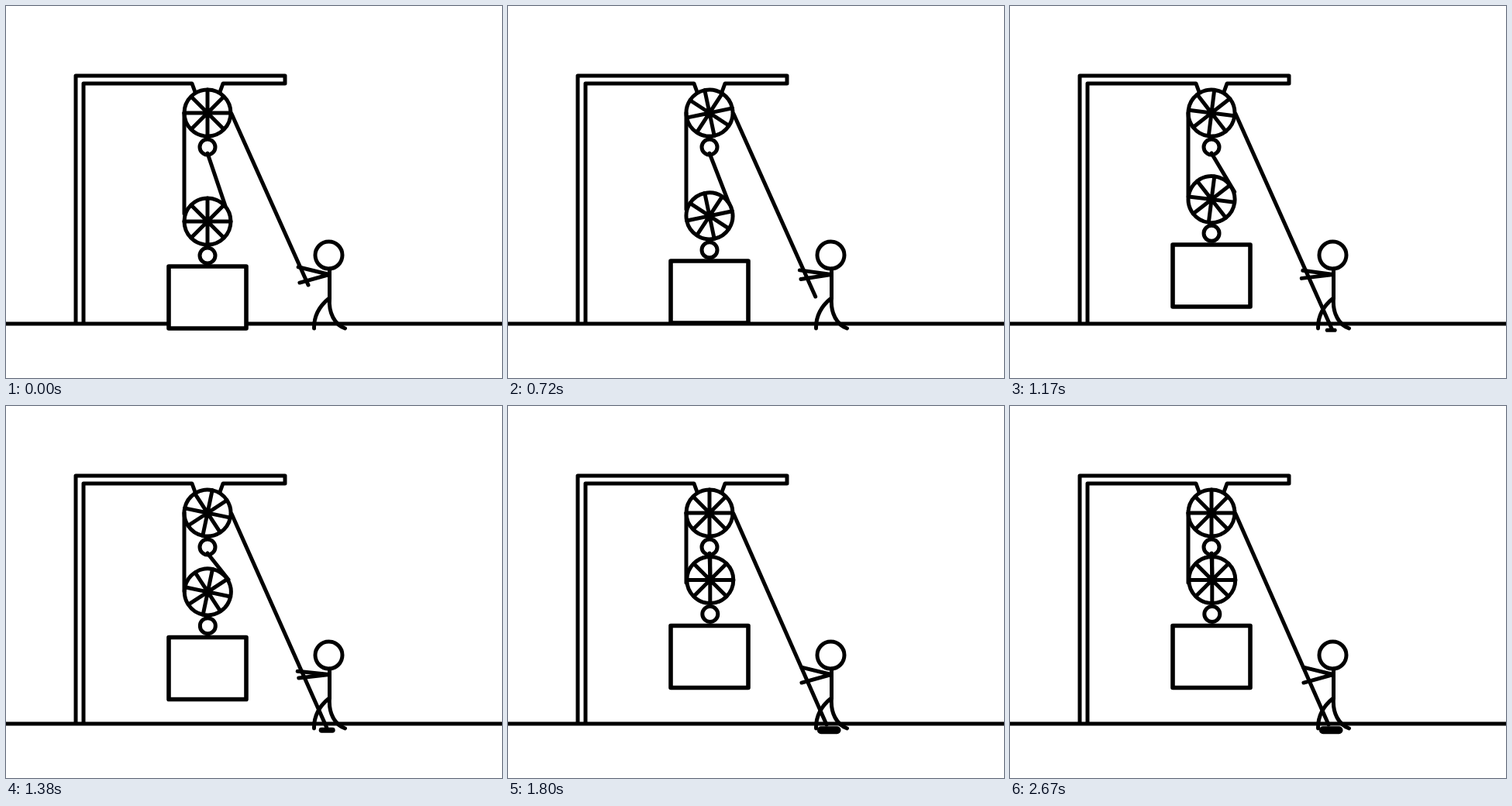
An HTML page for the animation above (2.7 s loop, 640x480 px).

```html
<!DOCTYPE html>
<html lang="en">
<head>
<meta charset="utf-8">
<title>Pulley</title>
<style>
html, body { margin: 0; width: 100%; height: 100%; overflow: hidden; background: #fff; }
svg { display: block; width: 100%; height: 100%; }
</style>
</head>
<body>
<svg viewBox="0 0 640 480" fill="none" stroke="#000" stroke-width="5" stroke-linecap="round" stroke-linejoin="round">
  <defs>
    <g id="wheel">
      <circle r="30"/>
      <path d="M-30 0H30M0-30V30M-21-21L21 21M-21 21L21-21"/>
    </g>
  </defs>
  <path d="M0 410H640"/>
  <path d="M90 408V90H360V100H280L276 111M100 408V100H240L244 111"/>
  <use id="top" href="#wheel"/>
  <circle cx="260" cy="182" r="10"/>
  <path id="rope"/>
  <use id="low" href="#wheel"/>
  <circle id="ring" r="10"/>
  <rect id="load" x="210" width="100" height="80" fill="#fff" stroke-width="5.6"/>
  <circle cx="416.5" cy="321.5" r="17.5"/>
  <path d="M417.5 339V378M417 377Q397 393 397.5 416M417.5 377C416 396 424 411 437.5 416"/>
  <path id="arms"/>
  <rect id="coil" fill="#000" stroke="none"/>
</svg>
<script>
const LOOP = 2700, STEP = 30, HOLD = 19, MID = 19, TURN = 27, END = 38;
const $ = id => document.getElementById(id);
const set = (id, attrs) => {
  for (const name in attrs) $(id).setAttribute(name, attrs[name]);
};
const lerp = (a, b, u) => a + (b - a) * u;

function draw(now) {
  const step = Math.floor(now % LOOP / STEP) - HOLD;
  const s = Math.max(0, Math.min(END, step));
  const late = Math.max(0, (s - MID) / (END - MID));

  // Two equal linear halves: a to b to c
  const tween = (a, b, c) => s < MID ? lerp(a, b, s / MID) : lerp(b, c, late);
  // Same, with an extra key in the second half
  const bend = (a, b, c, d) =>
    s < MID ? lerp(a, b, s / MID) :
    s < TURN ? lerp(b, c, (s - MID) / (TURN - MID)) :
    lerp(c, d, (s - TURN) / (END - TURN));

  const spin = tween(0, -45, 90);
  const lowX = tween(260, 260, 260.8);
  set('top', { transform: `translate(260 138) rotate(${spin})` });
  set('low', { transform: `translate(${lowX} ${tween(278, 251, 224.5)}) rotate(${spin})` });
  set('ring', { cx: lowX, cy: tween(322, 294.7, 268.5) });
  set('load', { y: tween(336, 309.3, 283.5) });

  const slack = `${bend(283, 290, 287, 261)} ${bend(258, 242, 224, 222)}`;
  const hand = `${tween(390, 415.5, 411)} ${tween(360, 417, 411)}`;
  set('rope', { d: `M230 138V${tween(268, 247, 228)}M260 190L${slack}M291 139L${hand}` });

  const swing = bend(1, -.63, .43, 1);
  const arm = (length, angle) =>
    `M417 346.5L${417 - length * Math.cos(angle)} ${346.5 + length * Math.sin(angle)}`;
  set('arms', { d: arm(bend(41, 41, 41, 39.5), -.24 * swing) + arm(39.5, .27 * swing) });

  const halfW = 7 + 8.3 * late, halfH = 2.4 + 2.6 * late;
  set('coil', {
    x: 414.2 - halfW, y: 418.2 - halfH, width: 2 * halfW, height: 2 * halfH, rx: halfH,
    visibility: s >= MID ? 'visible' : 'hidden'
  });
}

let start;
function tick(now) {
  start ??= now;
  draw(now - start);
  requestAnimationFrame(tick);
}
draw(0);
requestAnimationFrame(tick);
</script>
</body>
</html>
```
